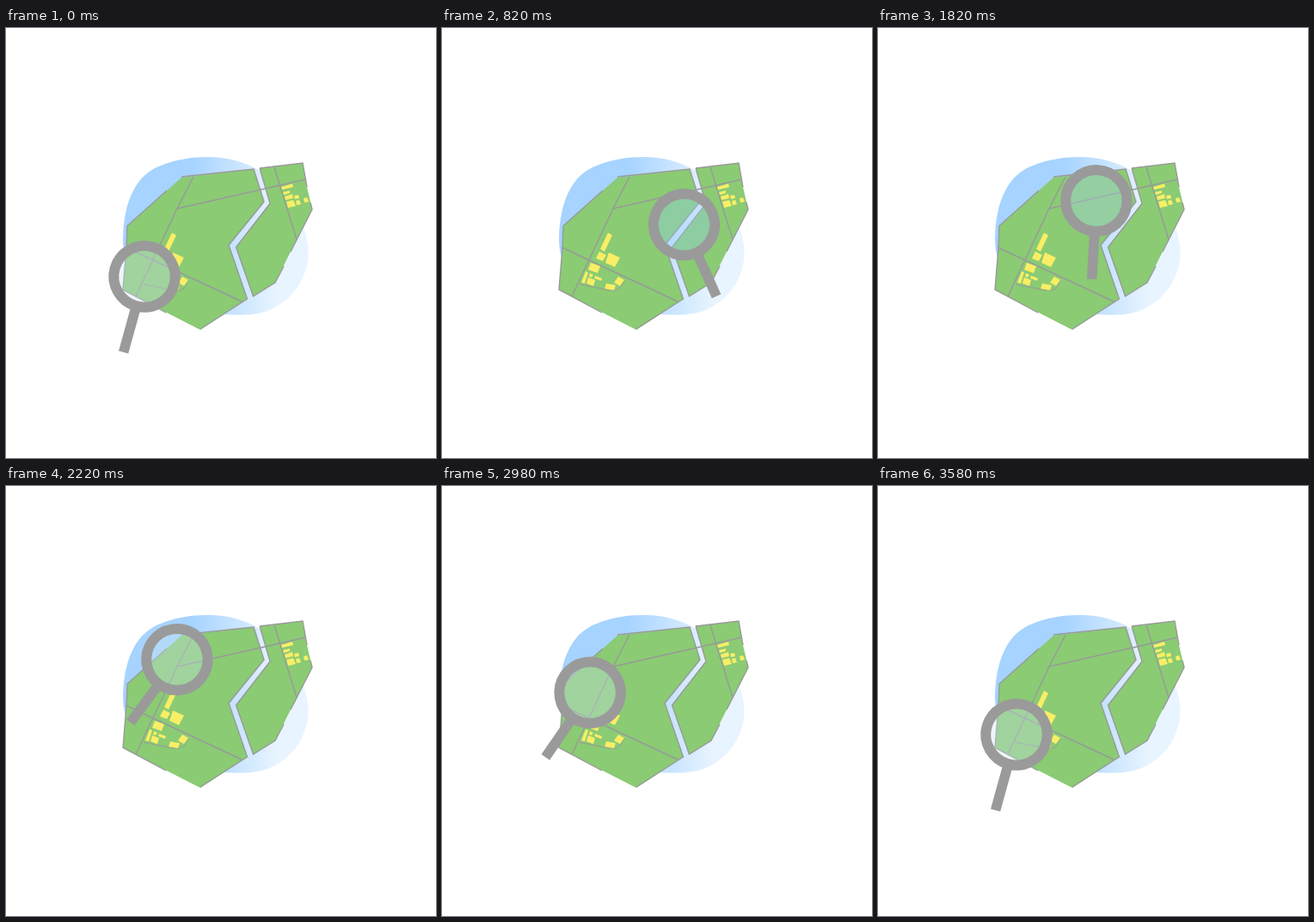
Write an HTML page that moves like this. It is 500 px wide and 500 px high and loops after 3620 ms.

```html
<!DOCTYPE html>
<html lang="en">
<head>
<meta charset="utf-8">
<title>Searching the map</title>
<style>
  html, body { margin: 0; width: 100%; height: 100%; overflow: hidden; background: #fff; }
  svg { display: block; width: 100vw; height: 100vh; }
  .land { fill: #8acb74; }
  .road { fill: none; stroke: #999; stroke-width: 1.4; }
  .house { fill: #f9ee66; }
</style>
</head>
<body>
<svg viewBox="0 0 500 500">
  <defs>
    <linearGradient id="sky" gradientUnits="userSpaceOnUse" x1="215" y1="0" x2="315" y2="0">
      <stop offset="0" stop-color="#a6d3ff"/>
      <stop offset="1" stop-color="#e8f4ff"/>
    </linearGradient>
    <mask id="outsideGlass" maskUnits="userSpaceOnUse" x="0" y="0" width="500" height="500">
      <rect width="500" height="500" fill="#fff"/>
      <circle id="shade" r="32"/>
    </mask>
  </defs>

  <path fill="url(#sky)" d="M136 245C137 200 152 170 180 160C197 153 215 150 235 150C258 150 273 155 288 162C322 180 351.5 225 351.5 262C351.5 295 325 330 285 333C230 337 136 320 136 245Z"/>

  <path class="land" d="M141 230L187 189L204 174L288 164L300 202L259 252.5L280.5 315L226 351L136 305L140 256Z"/>
  <path class="land" d="M295 163L345 157L350 185L356 211L331 260L313 296L287.5 312L267.5 255L307 204Z"/>

  <path class="road" d="M204 173L288 164L300 202L259 252.5L280.5 315L226 350M186 331L136 304L140 256L141 230L187 189M295 163L345 157L350 185M354 203L356 211L331 260M323 277L313 296L287.5 312L267.5 255L307 204L295 163"/>
  <path class="road" d="M218 173L199 210L151 312M199 210L349 176M139 255L274 318M312 162L338 246"/>
  <path class="road" stroke-opacity=".7" d="M160 298L190 304Q204 307 207 302L212 293"/>

  <g mask="url(#outsideGlass)">
    <path class="house" d="M193 238L198 241L189 260L184 257Z M183 260L191 264L187 271L179 268Z M194 261L207 267L201 278L190 273Z M173 273L184 277L181 285L170 281Z M205 289L212 293L207 300L200 296Z M191 297L202 299L200 305L189 303Z M167 283L170 284L166 297L162 296Z M172 285L176 287L174 290L171 289Z M170 290L178 293L176 300L168 297Z M178 288L186 291L185 294L177 291Z"/>
    <path class="house" d="M320 185L333 181L334 185L321 188Z M322 191L330 189L330 192L323 194Z M324 196L333 193L334 198L325 200Z M326 202L334 200L337 207L328 209Z M335 195L340 194L341 198L336 199Z M337 201L341 200L343 205L338 206Z M346 198L350 197L352 202L347 203Z"/>
  </g>

  <g id="magnifier">
    <circle id="glass" r="31" fill-opacity=".35"/>
    <rect x="-5.8" y="39" width="11.6" height="52.3" fill="#9a9a9a"/>
    <circle r="35.7" fill="none" stroke="#9a9a9a" stroke-width="12"/>
  </g>
</svg>
<script>
const LOOP = 3620;
const magnifier = document.getElementById('magnifier');
const glass = document.getElementById('glass');
const shade = document.getElementById('shade');

const home = { x: 161, y: 289, angle: 15.5 };
const east = { x: 321.6, y: 209.5, angle: -37.6 };
const north = { x: 178.3, y: 203.8, angle: 48.8 };

// bend is the offset of the route's middle control point from the straight line
const moves = [
  { start: 140, end: 1270, from: home, to: east, bend: { x: 0, y: -2 } },
  { start: 1400, end: 2550, from: east, to: north, bend: { x: 0, y: -12 } },
  { start: 2680, end: 3590, from: north, to: home, bend: { x: 2.5, y: 0 } }
];

const clamp = v => Math.min(1, Math.max(0, v));
const mix = (a, b, p) => a + (b - a) * p;

// Cubic Bezier timing (.167, .167, .667, 1): brisk start, soft landing
function ease(x) {
  if (x <= 0 || x >= 1) return clamp(x);
  const curve = (u, a, b) => 3 * u * (1 - u) ** 2 * a + 3 * u * u * (1 - u) * b + u ** 3;
  let low = 0, high = 1;
  for (let i = 0; i < 24; i++) {
    const mid = (low + high) / 2;
    if (curve(mid, .167, .667) < x) low = mid; else high = mid;
  }
  return curve(low, .167, 1);
}

function poseAt(t) {
  const move = moves.filter(m => t >= m.start).pop() || moves[0];
  const { from, to, bend } = move;
  const p = ease(clamp((t - move.start) / (move.end - move.start)));
  const bow = 2 * p * (1 - p);
  return {
    x: mix(from.x, to.x, p) + bow * bend.x,
    y: mix(from.y, to.y, p) + bow * bend.y,
    angle: mix(from.angle, to.angle, p)
  };
}

function render(t) {
  const { x, y, angle } = poseAt(t);
  const tint = clamp((x - 200) / 80);
  magnifier.setAttribute('transform', `translate(${x} ${y}) rotate(${angle})`);
  glass.setAttribute('fill', `rgb(${mix(201, 150, tint)},${mix(226, 205, tint)},${mix(236, 245, tint)})`);
  shade.setAttribute('cx', x);
  shade.setAttribute('cy', y);
  shade.setAttribute('fill-opacity', mix(1, .6, tint));
}

const begin = performance.now();
function tick() {
  render((performance.now() - begin) % LOOP);
  requestAnimationFrame(tick);
}
tick();
</script>
</body>
</html>
```
